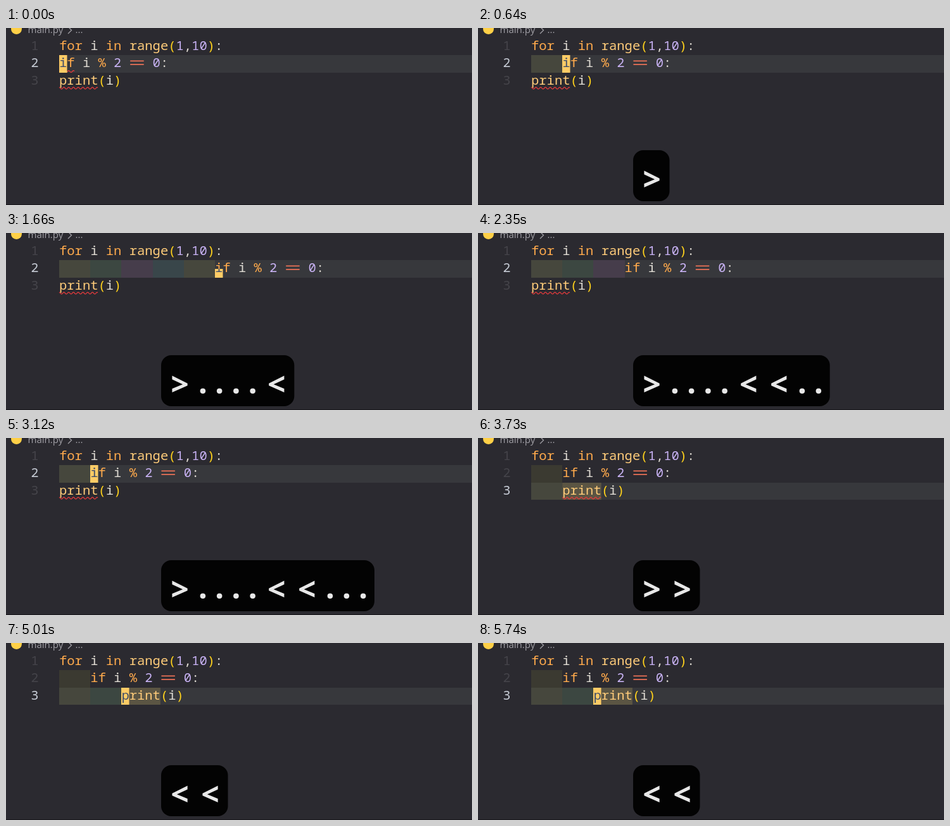
Recreate the animation shown at these times as an HTML page with a canvas. Size 736x281 px, loop 5.85 s.

```html
<!DOCTYPE html>
<html lang="en">
<head>
<meta charset="utf-8">
<title>Indent commands</title>
<style>
  html, body { margin: 0; width: 100%; height: 100%; overflow: hidden; background: #2b2a30; }
  canvas { display: block; }
</style>
</head>
<body>
<canvas id="stage" width="736" height="281"></canvas>
<script>
const ctx = document.getElementById('stage').getContext('2d');
const LOOP = 5850;
const CELL = 12.3, LEFT = 84;
const CODE_FONT = '20.5px "Noto Sans Mono", monospace';
const KEY_FONT = 'bold 50px "Open Sans", sans-serif';
const UI_FONT = '15px "Open Sans", sans-serif';
const TOPS = [15, 43, 71, 98], BASE = [35, 62, 90];
const COLOR = {
  bg: '#2b2a30', row: '#37383c', caret: '#ffcc66', key: '#ffaa4c', fn: '#ffcc7a',
  num: '#c9b3f5', text: '#dedad2', eq: '#ef7358', paren: '#ffd21c', error: '#e23a3c'
};
const RAINBOW = ['255,255,64', '127,255,127', '255,127,255', '79,236,236'];

// Each token: text, column, colour
const LINES = [
  [['for', 0, 'key'], ['i', 4, 'text'], ['in', 6, 'key'], ['range', 9, 'fn'], ['(', 14, 'paren'],
   ['1', 15, 'num'], [',', 16, 'text'], ['10', 17, 'num'], [')', 19, 'paren'], [':', 20, 'text']],
  [['if', 0, 'key'], ['i', 3, 'text'], ['%', 5, 'key'], ['2', 7, 'num'],
   ['==', 9, 'eq'], ['0', 12, 'num'], [':', 13, 'text']],
  [['print', 0, 'fn'], ['(', 5, 'paren'], ['i', 6, 'text'], [')', 7, 'paren']]
];

const START = { row: 1, col: 0, indent: [0, 0, 0], caret: 'block', keys: '', fade: 1,
                ifError: true, printError: true, word: false };
const off = { caret: '' }, on = { caret: 'block' };
const type = keys => ({ keys });
const shift = (row, n, extra) =>
  ({ indent: row === 1 ? [0, n, 0] : [0, 1, n], col: n * 4, caret: 'block', ...extra });

const EVENTS = [
  [80, { caret: 'half' }],
  [110, { keys: '>', fade: 0.6 }],
  [190, { fade: 1 }],
  [580, on],
  [610, shift(1, 1)],
  [640, { ifError: false }],
  [840, off],
  [1000, type('>.')],
  [1030, shift(1, 2)],
  [1130, type('>..')],
  [1230, shift(1, 3)],
  [1260, type('>...')],
  [1440, shift(1, 4)],
  [1470, type('>....')],
  [1600, shift(1, 5)],
  [1660, { keys: '>....<', caret: 'half' }],
  [1840, type('>....<<')],
  [1870, shift(1, 4)],
  [2070, off],
  [2100, type('>....<<.')],
  [2130, shift(1, 3)],
  [2330, off],
  [2340, type('>....<<..')],
  [2370, shift(1, 2)],
  [2570, off],
  [2690, type('>....<<...')],
  [2720, shift(1, 1)],
  [2910, off],
  [3120, on],
  [3280, { row: 2, fade: 0.5 }],
  [3310, { keys: '', fade: 1, word: true }],
  [3470, { keys: '>', caret: 'half' }],
  [3500, type('>>')],
  [3530, shift(2, 1)],
  [3730, off],
  [3860, type('>>.')],
  [3890, shift(2, 2)],
  [3990, { printError: false }],
  [4030, type('>>..')],
  [4060, shift(2, 3)],
  [4240, off],
  [4450, on],
  [4630, off],
  [4660, { fade: 0.5 }],
  [4690, { keys: '', fade: 1 }],
  [4900, { keys: '<', caret: 'half' }],
  [4930, type('<<')],
  [4960, shift(2, 2)],
  [5130, off],
  [5330, on],
  [5540, off],
  [5740, on]
];

function stateAt(t) {
  const s = { ...START };
  for (const [at, patch] of EVENTS) if (at <= t) Object.assign(s, patch);
  return s;
}

const colX = col => LEFT + col * CELL;

function box(x, y, w, h, color) {
  ctx.fillStyle = color;
  ctx.fillRect(x, y, w, h);
}

function text(str, x, y, color, font, align = 'left') {
  ctx.font = font;
  ctx.textAlign = align;
  ctx.fillStyle = color;
  ctx.fillText(str, x, y);
}

function squiggle(x, y, w) {
  ctx.beginPath();
  for (let i = 0; i <= w; i++) ctx.lineTo(x + i, y - 1.4 * Math.cos(i * Math.PI * 2 / 7.5));
  ctx.strokeStyle = COLOR.error;
  ctx.lineWidth = 1.3;
  ctx.stroke();
}

function drawHeader() {
  ctx.fillStyle = '#ffd047';
  ctx.beginPath();
  ctx.arc(16.5, 1.5, 8.5, 0, Math.PI * 2);
  ctx.fill();
  text('main.py', 34.5, 8, '#a09fa5', UI_FONT);
  text('...', 109.5, 8, '#a09fa5', UI_FONT);
  ctx.beginPath();
  ctx.moveTo(98, -2);
  ctx.lineTo(103.5, 3.5);
  ctx.lineTo(98, 9);
  ctx.strokeStyle = '#a09fa5';
  ctx.lineWidth = 1.3;
  ctx.stroke();
}

function drawTokens(row, indent, color) {
  for (const [str, col, tone] of LINES[row]) {
    const x = colX(col + indent * 4), fill = color || COLOR[tone];
    if (str === '==') {
      box(x + 1.5, BASE[row] - 10.5, 21.5, 1.7, fill);
      box(x + 1.5, BASE[row] - 5, 21.5, 1.7, fill);
    } else {
      text(str, x, BASE[row], fill, CODE_FONT);
    }
  }
}

function drawLine(row, s) {
  const top = TOPS[row], h = TOPS[row + 1] - top, indent = s.indent[row];
  const active = s.row === row;
  if (active) box(LEFT, top, 736 - LEFT, h, COLOR.row);
  for (let i = 0; i < indent; i++) {
    const x = Math.round(colX(i * 4)), next = Math.round(colX(i * 4 + 4));
    box(x, top, next - x, h, `rgba(${RAINBOW[i % 4]},0.075)`);
  }
  if (row === 2 && s.word) box(colX(indent * 4), top, CELL * 5, h, '#5b5543');
  text(row + 1, 51.5, BASE[row], active ? '#c6cbd5' : '#45444a', CODE_FONT, 'right');
  drawTokens(row, indent);
  if (row === 1 && s.ifError) squiggle(LEFT, 69, CELL * 2);
  if (row === 2 && s.printError) squiggle(colX(indent * 4), 95.5, CELL * 5);
  if (active && s.caret) drawCaret(row, s, top, h);
}

function drawCaret(row, s, top, h) {
  const x = Math.round(colX(s.col)), cut = s.caret === 'half' ? 14 : 0;
  ctx.save();
  ctx.beginPath();
  ctx.rect(x, top + cut, 12.5, h - cut);
  ctx.clip();
  box(x, top, 13, h, COLOR.caret);
  drawTokens(row, s.indent[row], '#41506a');
  ctx.restore();
}

function drawKeys(keys, fade) {
  if (!keys) return;
  const step = k => k === '.' ? 26.2 : 48;
  let x = 257, end = x;
  for (const k of keys) end += step(k);
  ctx.globalAlpha = fade;
  ctx.fillStyle = '#030303';
  ctx.beginPath();
  ctx.roundRect(245, 194, end - 247.5, 81, 16);
  ctx.fill();
  for (const k of keys) {
    const dot = k === '.';
    text(k, x + (dot ? 6 : 17.5), dot ? 255 : 258, '#e8e8e8', KEY_FONT, 'center');
    x += step(k);
  }
  ctx.globalAlpha = 1;
}

function draw() {
  const s = stateAt(performance.now() % LOOP);
  box(0, 0, 736, 281, COLOR.bg);
  drawHeader();
  for (let row = 0; row < 3; row++) drawLine(row, s);
  box(0, 280, 736, 1, '#17161b');
  drawKeys(s.keys, s.fade);
  requestAnimationFrame(draw);
}
draw();
</script>
</body>
</html>
```
